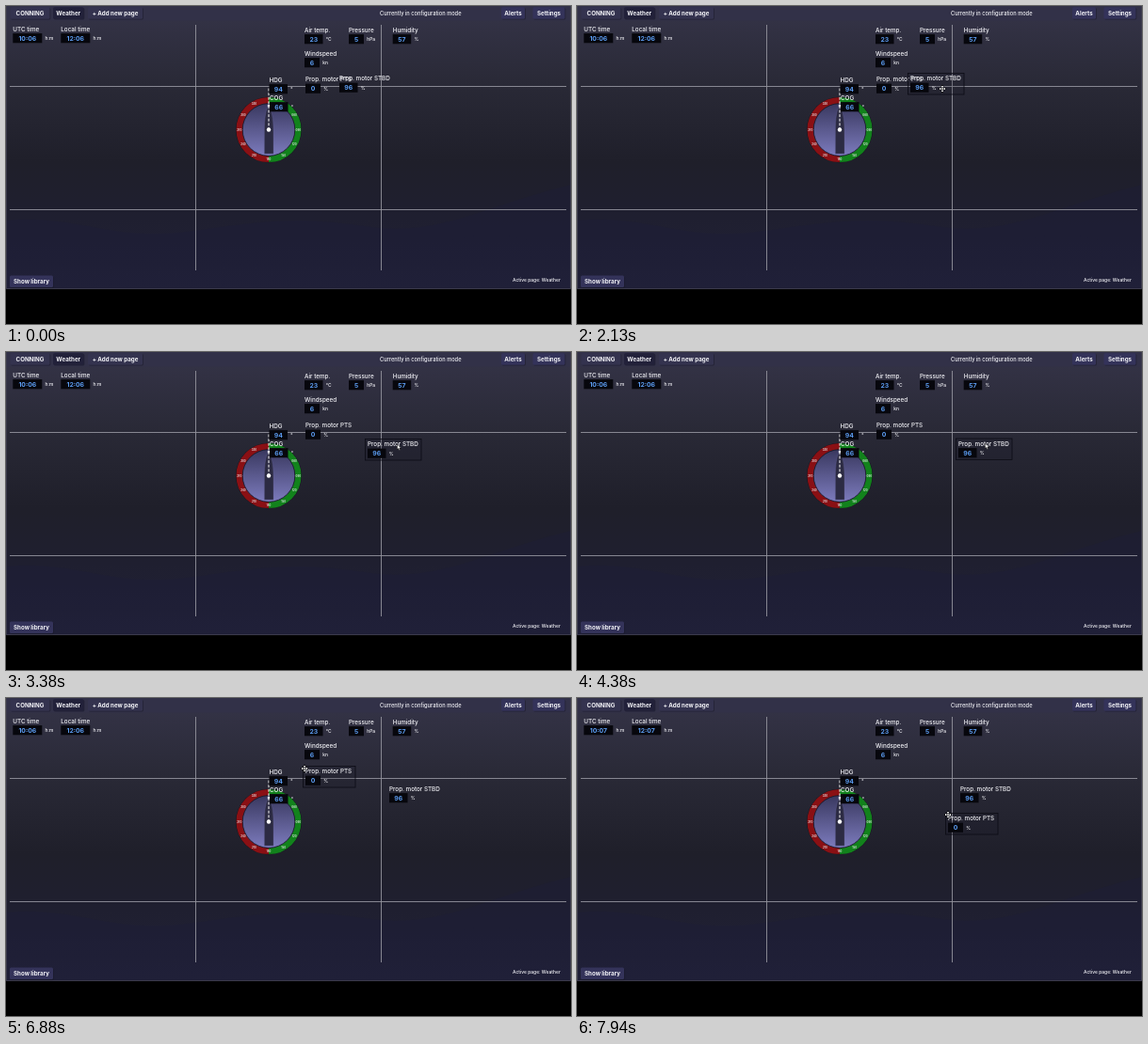
Recreate the animation shown at these times as an HTML page. Size 600x338 px, loop 8000 ms.

```html
<!DOCTYPE html>
<html lang="en">
<head>
<meta charset="utf-8">
<title>Conning display</title>
<style>
  html, body { margin: 0; width: 100%; height: 100%; overflow: hidden; background: #000; }
  svg { display: block; width: 600px; height: 338px; }
  text { font: 500 6.3px Inter, "Open Sans", sans-serif; fill: #f4f4f8; }
  .button { font-size: 6.2px; font-weight: 700; text-anchor: middle; }
  .value { font-size: 6.8px; font-weight: 700; fill: #5c9df2; text-anchor: middle; }
  .unit { font-size: 4.9px; }
  .tick { font-size: 2.8px; font-weight: 600; text-anchor: middle; }
  .frame { fill: #1c1c29; fill-opacity: .2; stroke: #0c0c14; stroke-width: .8; }
</style>
</head>
<body>
<svg viewBox="0 0 600 338">
  <defs>
    <linearGradient id="sea" x2="0" y2="1">
      <stop stop-color="#353448"/><stop offset=".28" stop-color="#292936"/>
      <stop offset=".55" stop-color="#1f1f2a"/><stop offset=".75" stop-color="#1f1f30"/>
      <stop offset="1" stop-color="#222238"/>
    </linearGradient>
    <linearGradient id="dial" x2="0" y2="1">
      <stop stop-color="#39385f"/><stop offset="1" stop-color="#7c7bbd"/>
    </linearGradient>
    <path id="cross" d="M-3 0H3M0-3V3M-2-1-3 0-2 1M2-1 3 0 2 1M-1-2 0-3 1-2M-1 2 0 3 1 2"/>
  </defs>
  <rect width="600" height="301" fill="url(#sea)"/>
  <g fill="#1d1d3a" opacity=".35">
    <path d="M0 228C70 220 110 250 190 240S300 222 380 234 500 215 600 190V300H0Z"/>
    <path d="M0 262C80 240 150 275 240 258S400 270 470 250 560 262 600 250V300H0Z"/>
  </g>
  <rect width="600" height="15.5" fill="#323148"/>
  <path d="M.5 0V300.5H599.5V0" fill="none" stroke="#3b3a4b"/>
  <path d="M201.5 20V281M398.5 20V281M4 85.5H595M4 216.5H595" stroke="#92929c" stroke-width=".9"/>
  <g id="bar"></g>
  <text x="397" y="10" style="font-size:5.7px">Currently in configuration mode</text>
  <text x="538" y="293" style="font-size:4.95px">Active page: Weather</text>
  <g id="compass" transform="translate(279 131.5)">
    <circle r="35" fill="#16161f"/>
    <path d="M0-31.2A31.2 31.2 0 0 0 0 31.2" fill="none" stroke="#8a1014" stroke-width="6.6"/>
    <path d="M0-31.2A31.2 31.2 0 0 1 0 31.2" fill="none" stroke="#12821c" stroke-width="6.6"/>
    <circle r="27.8" fill="url(#dial)" stroke="#1b1b2c" stroke-width=".8"/>
    <path d="M0-27C3.5-20 4.8-12 5 0V25.5H-4.6V0C-4.6-12-3.5-20 0-27Z" fill="#2c2b43" stroke="#605f90" stroke-width=".4"/>
    <path d="M0-44V0" stroke="#fff" stroke-dasharray="3 1.6"/>
    <circle r="2.2" fill="#fff"/><circle cy="-25.5" r="1.3" fill="#fff"/>
  </g>
  <g id="widgets"></g>
  <path id="arrow" d="M-1.6-3V2.6L-.3 1.5 .7 3.5 1.7 3 .8 1.1H2.5Z" fill="#fff" stroke="#000" stroke-width=".5"/>
  <g id="move" fill="none">
    <use href="#cross" stroke="#000" stroke-width="1.6"/>
    <use href="#cross" stroke="#fff" stroke-width=".8"/>
  </g>
</svg>
<script>
const LOOP = 8000, STEP = 62.5;
const $ = id => document.getElementById(id);

const button = (label, x, y, w, fill) =>
  `<rect x="${x + .8}" y="${y + .9}" width="${w}" height="12.5" rx="1.5" fill="#1a1a28" opacity=".6"/>
   <rect x="${x}" y="${y}" width="${w}" height="12.5" rx="1.5" fill="${fill}"/>
   <text class="button" x="${x + w / 2}" y="${y + 8.5}">${label}</text>`;

// A label with a value box and a unit; y is the middle of the label.
const widget = (label, value, unit, x, y, boxWidth, id = '', frameWidth = 0) =>
  `<g id="${id}" transform="translate(${x} ${y})">
    ${frameWidth ? `<rect class="frame" x="-2.5" y="-5.5" width="${frameWidth}" height="22.5"/>` : ''}
    <text y="2">${label}</text>
    <rect y="4.6" width="${boxWidth}" height="10.2" fill="#07070d"/>
    <text class="value" x="${boxWidth / 2}" y="12">${value}</text>
    <text class="unit" x="${boxWidth + 3.3}" y="11.8">${unit}</text>
  </g>`;

$('bar').innerHTML =
  button('CONNING', 4.5, 1.2, 42, '#34334f') +
  button('Weather', 50, 1.2, 32.5, '#22213a') +
  button('+ Add new page', 87, 1.2, 58, '#34334f') +
  button('Alerts', 526, 1.2, 25, '#34335a') +
  button('Settings', 559.5, 1.2, 34, '#34335a') +
  button('Show library', 4, 286.5, 46, '#34335a');

for (let deg = 30; deg < 360; deg += 30) {
  const a = deg * Math.PI / 180;
  $('compass').innerHTML += `<text class="tick" x="${31.3 * Math.sin(a)}" y="${1 - 31.3 * Math.cos(a)}">${String(deg).padStart(3, '0')}</text>`;
}

$('widgets').innerHTML =
  widget('UTC time', '10:06', 'h:m', 7.3, 24.5, 31, 'utc') +
  widget('Local time', '12:06', 'h:m', 58.3, 24.5, 31, 'local') +
  widget('Air temp.', 23, '°C', 317, 25.5, 19.5) +
  widget('Pressure', 5, 'hPa', 364, 25.5, 16) +
  widget('Humidity', 57, '%', 410.7, 25.5, 19.5) +
  widget('Windspeed', 6, 'kn', 317, 50.5, 16) +
  widget('HDG', 94, '°', 279.5, 78.5, 19.5) +
  widget('COG', 66, '°', 280, 97.5, 19.5) +
  widget('Prop. motor PTS', 0, '%', 318, 78, 16, 'port', 55.5) +
  widget('Prop. motor STBD', 96, '%', 354, 77, 19.5, 'starboard', 59.5);

// Keyframes: time, x, y
const cursorPath = [
  [1000, 567, 239], [1250, 455, 158], [1440, 455, 158], [2125, 388, 88], [2750, 388, 88],
  [2900, 387, 80], [3375, 417, 101], [3700, 432, 101], [4375, 435, 100], [4500, 437, 99],
  [5125, 379, 85], [5500, 345, 84], [5690, 345, 84], [5937, 343, 84], [6440, 317, 75],
  [6980, 317, 75], [7375, 348, 98], [7560, 367, 109], [7937, 394, 124]];
const starboardPath = [[2900, 354, 77], [3375, 384, 98], [3700, 402, 98.5], [4375, 405, 97.5], [4500, 407, 96.5]];
const portPath = [[6980, 318, 78], [7375, 349.3, 101.5], [7560, 366, 112.5], [7937, 394, 128]];

function along(path, t) {
  const next = path.findIndex(p => p[0] > t);
  if (next === 0) return path[0].slice(1);
  if (next < 0) return path[path.length - 1].slice(1);
  const [t0, x0, y0] = path[next - 1], [t1, x1, y1] = path[next];
  const k = (t - t0) / (t1 - t0);
  return [x0 + (x1 - x0) * k, y0 + (y1 - y0) * k];
}

const place = (el, [x, y]) => el.setAttribute('transform', `translate(${x} ${y})`);
const show = (el, on) => el.style.visibility = on ? 'visible' : 'hidden';

function placeWidget(id, path, frameWidth, t, [cx, cy]) {
  const [x, y] = along(path, t), dx = cx - x + 2.5, dy = cy - y + 5.5;
  const hovered = t > 1500 && dx > 0 && dx < frameWidth && dy > 0 && dy < 22.5;
  place($(id), [x, y]);
  show($(id).querySelector('.frame'), hovered);
  return hovered;
}

function draw(now) {
  const t = Math.floor(now % LOOP / STEP) * STEP;
  const cursor = along(cursorPath, t);
  const overStarboard = placeWidget('starboard', starboardPath, 59.5, t, cursor);
  const overPort = placeWidget('port', portPath, 55.5, t, cursor);
  const moving = (overStarboard && t < 2800) || (overPort && t > 6200);
  place($('arrow'), cursor);
  place($('move'), cursor);
  show($('arrow'), t > 800 && !moving);
  show($('move'), moving);
  const minute = t < 7600 ? '06' : '07';
  $('utc').querySelector('.value').textContent = '10:' + minute;
  $('local').querySelector('.value').textContent = '12:' + minute;
  requestAnimationFrame(draw);
}
draw(performance.now());
</script>
</body>
</html>
```
